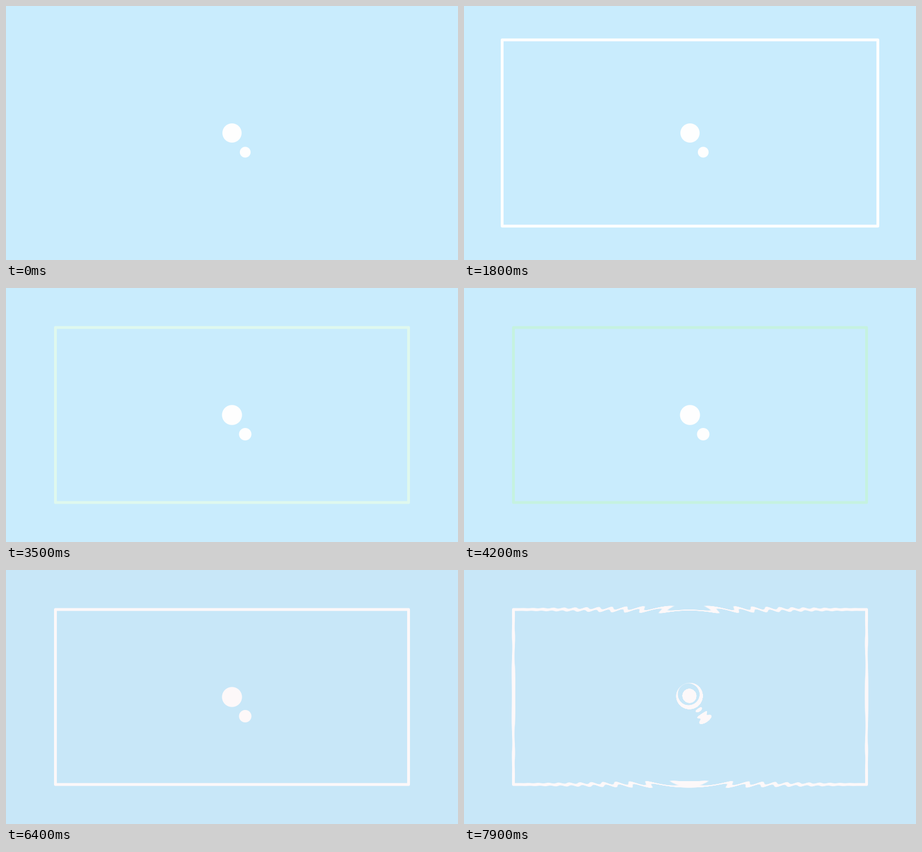
Recreate the animation shown at these times as an HTML page with a canvas. Size 800 by 450 pixels, loop 8000 ms.

```html
<!DOCTYPE html>
<html lang="en">
<head>
<meta charset="utf-8">
<title>Pulse</title>
<style>
html, body { margin: 0; width: 100%; height: 100%; overflow: hidden; background: #c9ecfd; }
canvas { display: block; }
</style>
</head>
<body>
<canvas width="800" height="450"></canvas>
<script>
const W = 800, H = 450, LOOP = 8000;
const SKY = [201, 236, 253], WHITE = [254, 254, 254];
const DUSK = [198, 210, 227], ROSE = [251, 223, 227], MINT = [195, 242, 223];
const RIPPLE = { x: 398.5, y: 222, wavelength: 15.5 };

const ctx = document.querySelector('canvas').getContext('2d');
const image = ctx.createImageData(W, H);
const pixels = new Uint32Array(image.data.buffer);

const clamp = v => Math.max(0, Math.min(1, v));
const mix = (a, b, f) => a.map((v, i) => v + (b[i] - v) * f);
const pack = c => (255 << 24 | Math.round(c[2]) << 16 | Math.round(c[1]) << 8 | Math.round(c[0])) >>> 0;

// Half a sine wave between two times, zero elsewhere
const pulse = (t, from, to) => t > from && t < to ? Math.sin(Math.PI * (t - from) / (to - from)) : 0;

// Signed distance to the outline of a centred box
function boxEdge(x, y, halfW, halfH) {
  const dx = Math.abs(x - 400) - halfW, dy = Math.abs(y - 225) - halfH;
  return Math.abs(Math.hypot(Math.max(dx, 0), Math.max(dy, 0)) + Math.min(Math.max(dx, dy), 0));
}

function draw(t) {
  const bulge = pulse(t, -600, 2400);
  const tint = pulse(t, 6300, 8000);
  const sky = mix(SKY, DUSK, tint);
  const dotColor = mix(WHITE, ROSE, tint);
  const frameColor = mix(dotColor, MINT, pulse(t, 3200, 4900));
  const frameAlpha = clamp(t / 400);
  const halfW = 312.5 + 34 * bulge, halfH = 155 + 17 * bulge;
  const bigR = 17.7 - 1.2 * bulge, smallR = 11 - 2.5 * bulge;

  const strength = 0.023 * clamp((t - 6450) / 800);
  const reach = 390 - 0.075 * Math.max(0, t - 7300);
  const front = 157 + 0.0275 * (t - 7300);
  const k = 2 * Math.PI / RIPPLE.wavelength;

  function shade(px, py) {
    let x = px + 0.5, y = py + 0.5;
    if (strength) {
      const dx = x - RIPPLE.x, dy = y - RIPPLE.y, r = Math.hypot(dx, dy);
      const shift = -strength * Math.max(0, reach - r) * Math.sin(k * (r - front)) / (r || 1);
      x += dx * shift;
      y += dy * shift;
    }
    const line = clamp(3 - boxEdge(x, y, halfW, halfH)) * frameAlpha;
    const dots = Math.max(
      clamp(bigR + 0.5 - Math.hypot(x - 400, y - 225)),
      clamp(smallR + 0.5 - Math.hypot(x - 423.4, y - 259)));
    if (line || dots) pixels[py * W + px] = pack(mix(mix(sky, frameColor, line), dotColor, dots));
  }

  function shadeArea(x0, y0, x1, y1) {
    for (let y = Math.floor(y0); y < y1; y++)
      for (let x = Math.floor(x0); x < x1; x++) shade(x, y);
  }

  pixels.fill(pack(sky));
  const m = 14, left = 400 - halfW, right = 400 + halfW, top = 225 - halfH, bottom = 225 + halfH;
  shadeArea(left - m, top - m, right + m, top + m);
  shadeArea(left - m, bottom - m, right + m, bottom + m);
  shadeArea(left - m, top + m, left + m, bottom - m);
  shadeArea(right - m, top + m, right + m, bottom - m);
  shadeArea(365, 190, 455, 295);
  ctx.putImageData(image, 0, 0);
}

const start = performance.now();
function tick() {
  draw((performance.now() - start) % LOOP);
  requestAnimationFrame(tick);
}
tick();
</script>
</body>
</html>
```
